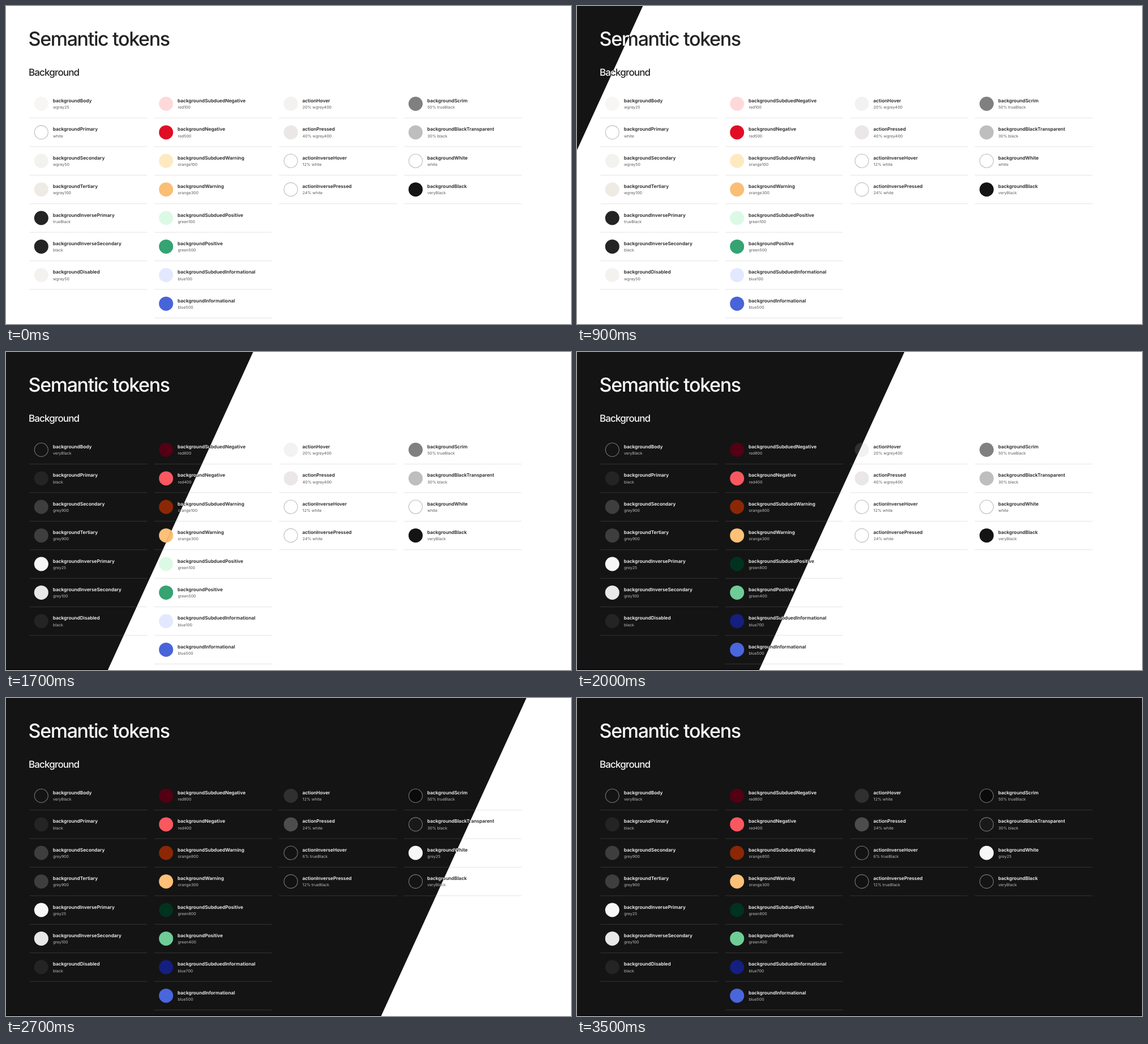
An HTML page that plays this animation: 998 px wide and 561 px high, repeating every 8000 ms.

```html
<!DOCTYPE html>
<html lang="en">
<head>
<meta charset="utf-8">
<title>Semantic tokens</title>
<style>
  html, body { margin: 0; width: 100%; height: 100%; overflow: hidden; background: #fff; }
  svg { display: block; width: 998px; height: 561px; }
  text { font-family: Inter, "Liberation Sans", sans-serif; text-rendering: geometricPrecision; fill: var(--ink); }
  .title { font-size: 34px; font-weight: 500; letter-spacing: -.04em; }
  .heading { font-size: 17px; font-weight: 500; letter-spacing: -.05em; }
  .name { font-size: 8.3px; font-weight: 600; }
  .value { font-size: 7px; fill: var(--soft); }
  .rule { stroke: var(--rule); stroke-width: .8; }
  .ring { stroke: var(--ring); stroke-width: 1.1; }
  #light { --page: #fff; --ink: #232323; --soft: #5c5c5c; --rule: #dedede; --ring: #bdbdbd; }
  #dark { --page: #141414; --ink: #f7f7f7; --soft: #bcbcbc; --rule: #3d3d3d; --ring: #777; }
</style>
</head>
<body>
<svg viewBox="0 0 998 561">
  <clipPath id="wipe"><polygon id="edge"/></clipPath>
  <g id="light"></g>
  <g clip-path="url(#wipe)"><g id="dark"></g></g>
</svg>
<script>
// Each row: name | light value, colour | dark value, colour; "o" marks an outlined swatch
const columns = [
  `Body|wgrey25,#f7f6f4|veryBlack,#141414o
Primary|white,#ffffffo|black,#242424
Secondary|wgrey50,#f3f2ee|grey900,#3e3e3e
Tertiary|wgrey100,#eeebe4|grey900,#3e3e3e
InversePrimary|trueBlack,#242424|grey25,#f7f7f7
InverseSecondary|black,#242424|grey100,#e8e8e8
Disabled|wgrey50,#f3f2ef|black,#242424`,
  `SubduedNegative|red100,#ffd9d9|red800,#540014
Negative|red500,#e00d25|red400,#f95860
SubduedWarning|orange100,#ffe9c1|orange800,#8b2705
Warning|orange300,#fabe75|orange300,#ffc078
SubduedPositive|green100,#dcf9e6|green800,#00331f
Positive|green500,#35a372|green400,#6ecd97
SubduedInformational|blue100,#e2e9ff|blue700,#141f80
Informational|blue500,#4864d9|blue500,#4a66dc`,
  `actionHover|20% wgrey400,#f3f2f1|12% white,#303030
actionPressed|40% wgrey400,#eae7e6|24% white,#4d4d4d
actionInverseHover|12% white,#ffffffo|6% trueBlack,#131313o
actionInversePressed|24% white,#ffffffo|12% trueBlack,#121212o`,
  `Scrim|50% trueBlack,#808080|50% trueBlack,#0a0a0ao
BlackTransparent|30% black,#bebebe|30% black,#191919o
White|white,#ffffffo|grey25,#f7f7f7
Black|veryBlack,#141414|veryBlack,#141414o`
].map(column => column.split('\n').map(row => row.split('|')));

const text = (kind, x, y, words) => `<text class="${kind}" x="${x}" y="${y}">${words}</text>`;

function token(cells, mode, x, y) {
  const name = cells[0].startsWith('action') ? cells[0] : 'background' + cells[0];
  const [value, paint] = cells[mode].split(',');
  const ring = paint.endsWith('o');
  return `<circle cx="${x + 20.8}" cy="${y}" r="${ring ? 12 : 12.5}" fill="${paint.slice(0, 7)}" class="${ring ? 'ring' : ''}"/>`
    + text('name', x + 41.2, y - 2.4, name)
    + text('value', x + 41.5, y + 8.8, value)
    + `<path class="rule" d="M${x} ${y + 25.2}h208"/>`;
}

function board(mode) {
  const rows = columns.map((column, c) => column.map((cells, r) =>
    token(cells, mode, 41.5 + c * 220.4, 172.5 + r * 50.38)).join(''));
  return '<rect width="998" height="561" fill="var(--page)"/>'
    + text('title', 39.6, 70, 'Semantic tokens')
    + text('heading', 40, 123.4, 'Background')
    + rows.join('');
}

light.innerHTML = board(1);
dark.innerHTML = board(2) + '<rect y="560" width="998" height="1"/>';

// The slanted edge follows a sine ease and advances every 100 ms
function frame(now) {
  const step = Math.min(Math.floor(now % 8000 / 100), 35);
  const top = step < 5 ? -10 : 720 + 805 * Math.sin(.061 * (step - 22.9));
  edge.setAttribute('points', `-900,0 ${top},0 ${top - 256.6},561 -900,561`);
  requestAnimationFrame(frame);
}
frame(0);
</script>
</body>
</html>
```
